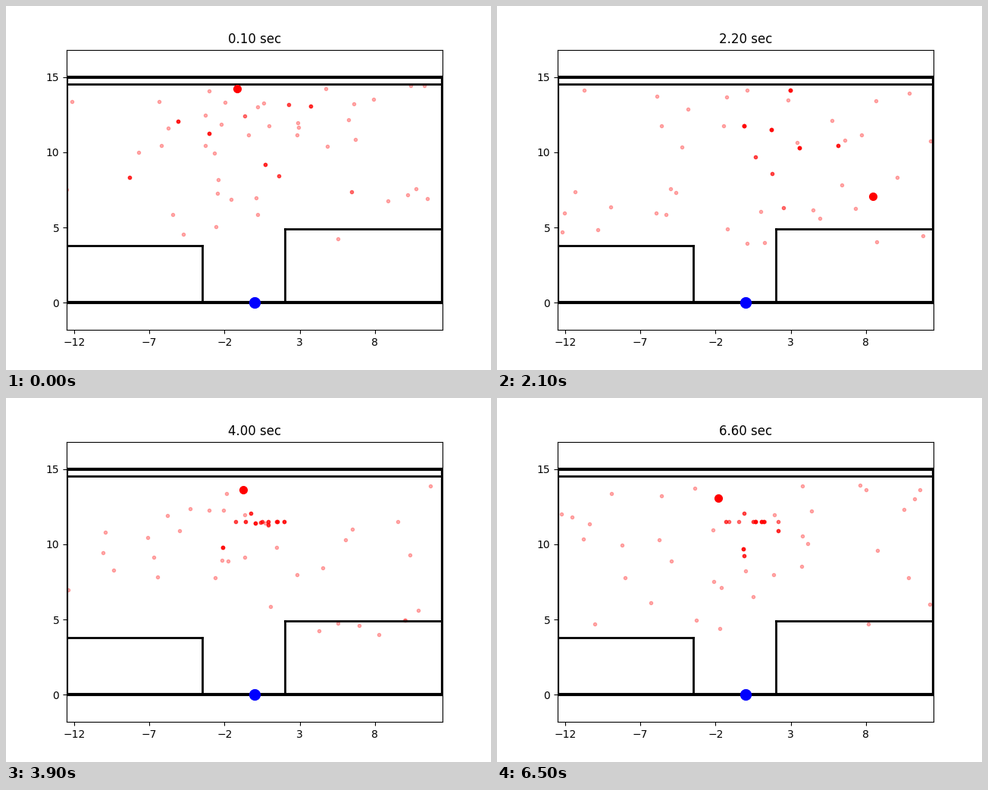
A matplotlib script for the animation above (6600 ms loop, 640 by 480 pixels).

```python
import numpy as np
import matplotlib.pyplot as plt
from matplotlib.animation import FuncAnimation

FRAMES, STEP = 66, 100
W, H = 12.5, 15
LOW, HIGH = 3.9, 14.5       # vertical range of the particles
STRAYS, DRAWS = 35, 50
REST = np.array([0.4, 11.5])  # where the filter settles

# Key points of the estimate: time in seconds, x, y
TRACK = np.array([
    (0.1, -1.15, 14.2), (1.0, 3.12, 11.2), (2.2, 8.48, 7.07),
    (3.0, 0.87, 11.45), (4.0, -0.76, 13.6), (5.7, -0.55, 12.65),
    (6.6, -1.8, 13.07),
])


def estimate(t):
    return np.array([np.interp(t, TRACK[:, 0], col) for col in TRACK.T[1:]])


def particles(t, rng):
    """Resampled cloud: it tightens as the filter converges, plus strays."""
    settled = 1 / (1 + np.exp((2.6 - t) * 6))
    early = 0.5 * estimate(t) + (0, 4)
    center = early + (REST - early) * settled
    spread = np.array([4, 2.8]) * (1 - settled) + np.array([1.1, 1]) * settled

    spots = rng.normal(center, spread, (rng.integers(9, 20), 2))
    on_row = rng.random(len(spots)) < 0.5 * settled
    spots[on_row, 1] = REST[1]
    core = spots[rng.integers(len(spots), size=DRAWS)]

    stray = rng.uniform((-W, LOW), (W, HIGH), (STRAYS, 2))
    x, y = np.vstack([core, stray]).T
    inside = (abs(x) < W) & (y > LOW) & (y < HIGH)
    return x[inside], y[inside]


fig = plt.figure(figsize=(6.4, 4.8), dpi=100)
ax = fig.add_subplot()
half = W * 369.6 / 496
ax.set(xlim=(-W, W), ylim=(H / 2 - half, H / 2 + half),
       xticks=range(-12, 13, 5), yticks=range(0, 16, 5))


def hline(y, x0, x1, lw):
    ax.plot([x0, x1], [y, y], color="k", lw=lw)


def vline(x, top, lw):
    ax.plot([x, x], [0, top], color="k", lw=lw)


for side in (-W, W):
    vline(side, H, 3)
for level in (0, H):
    hline(level, -W, W, 3)
hline(14.53, -W, W, 2)
for inner, outer, top in ((-3.47, -W, 3.8), (2, W, 4.9)):
    hline(top, inner, outer, 2)
    vline(inner, top, 2)

cloud, = ax.plot([], [], "r.", alpha=0.3, zorder=1.5)
guess, = ax.plot([], [], "ro", ms=7, zorder=3)
ax.plot(0, 0, "bo", ms=10, zorder=3)
title = ax.set_title("")


def update(i):
    t = (i + 1) / 10
    x, y = estimate(t)
    guess.set_data([x], [y])
    cloud.set_data(*particles(t, np.random.default_rng(100 + i)))
    title.set_text(f"{t:.2f} sec")
    return cloud, guess, title


anim = FuncAnimation(fig, update, frames=FRAMES, interval=STEP, repeat=True,
                     repeat_delay=0)
plt.show()
```
